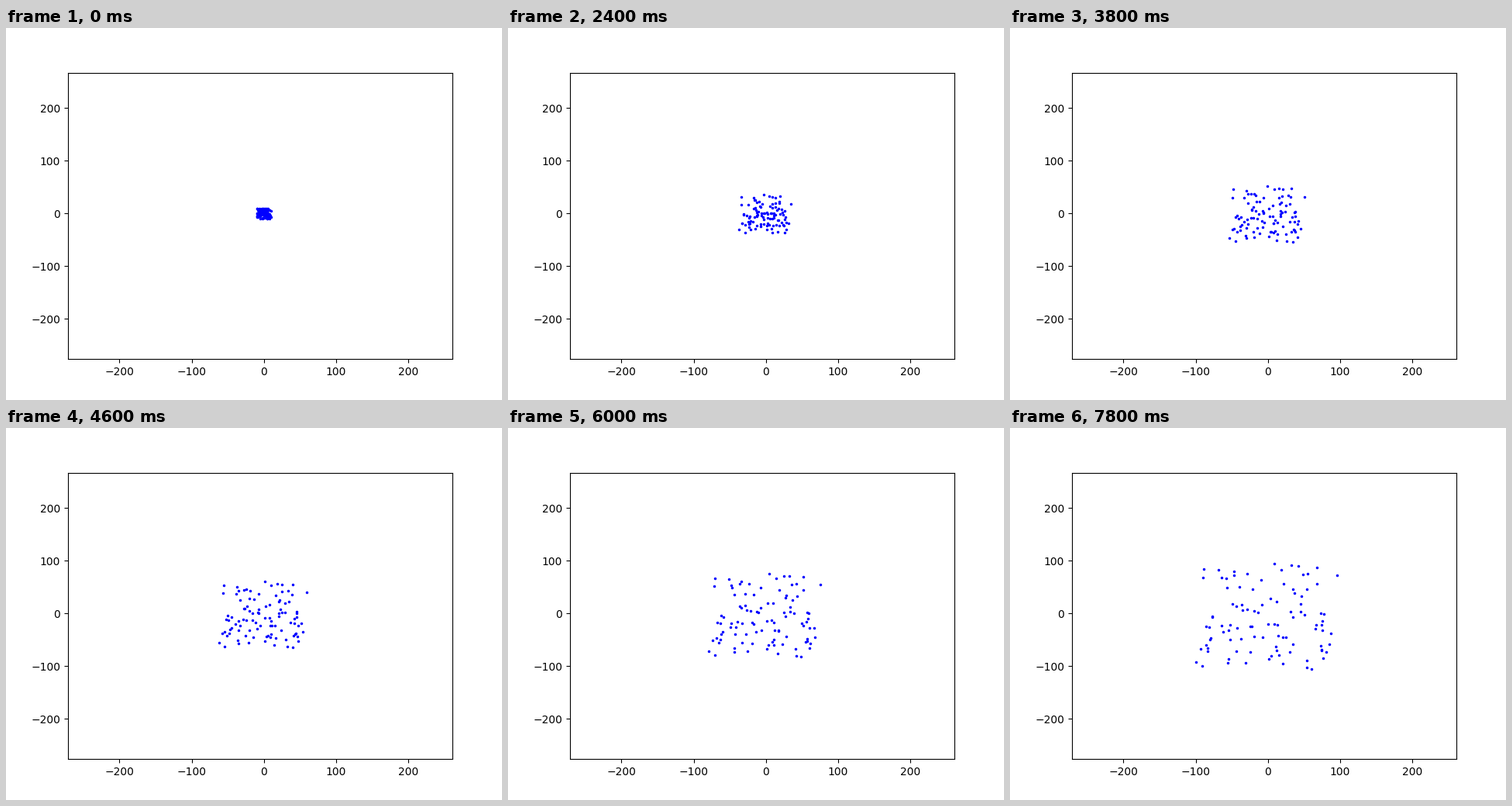
Animation of 640x480 px, one loop 8 s. Source, as a matplotlib script:

```python
import numpy as np
import matplotlib.pyplot as plt
from matplotlib.animation import FuncAnimation

FRAMES = 40
STEP_MS = 200
COUNT = 100
LOW, HIGH = np.array([-100, -105]), np.array([96, 95])  # cloud's final extent


def make_particles(seed=5):
    """Start in a small square, drift in straight lines to fill a large one."""
    rng = np.random.default_rng(seed)
    start = rng.uniform(-10, 10, (COUNT, 2))
    end = start + rng.uniform(-90, 90, (COUNT, 2))
    end = LOW + (HIGH - LOW) * (end - end.min(0)) / np.ptp(end, axis=0)
    return start, end


start, end = make_particles()

fig, ax = plt.subplots(figsize=(6.4, 4.8), dpi=100)
fig.subplots_adjust(left=0.125, right=0.9, bottom=0.11, top=0.88)
ax.set_xlim(-271.3, 260.8)
ax.set_ylim(-276, 267)
ax.set_xticks(range(-200, 201, 100))
ax.set_yticks(range(-200, 201, 100))
dots, = ax.plot([], [], "b.", markersize=3)


def draw(frame):
    t = frame / (FRAMES - 1)
    dots.set_data(*(start + (end - start) * t).T)
    return dots,


anim = FuncAnimation(fig, draw, frames=FRAMES, init_func=lambda: draw(0),
                     interval=STEP_MS, repeat=True, repeat_delay=0)
plt.show()
```
